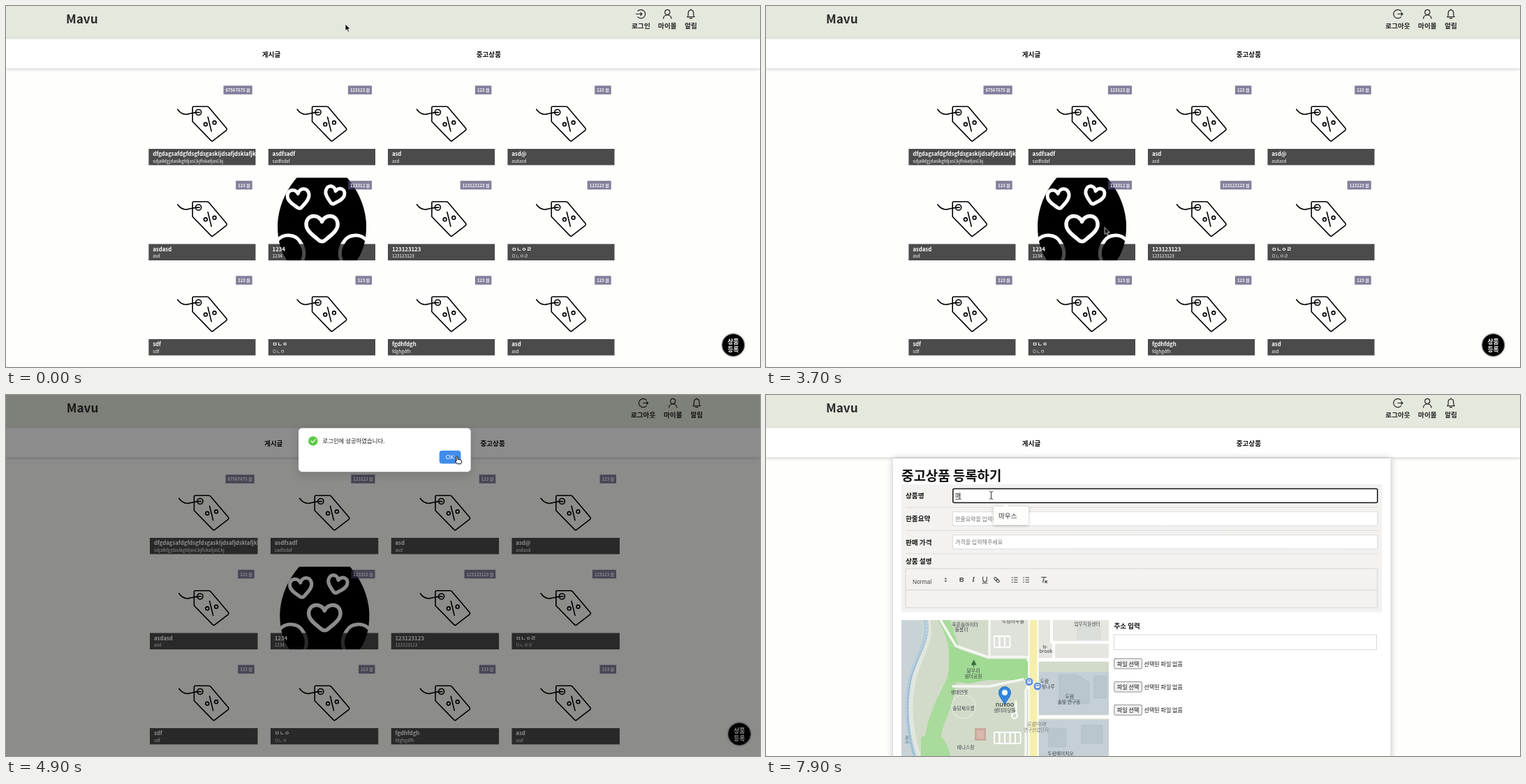
An HTML page with a canvas that plays this animation: 1080 by 518 pixels, repeating every 8 s.

```html
<!DOCTYPE html>
<html lang="ko">
<head>
<meta charset="utf-8">
<style>
html, body { margin: 0; width: 100%; height: 100%; overflow: hidden; background: #fefefd; }
canvas { display: block; }
</style>
</head>
<body>
<canvas id="stage" width="1080" height="518"></canvas>
<script>
const ctx = document.getElementById('stage').getContext('2d');
const LOOP = 8000;
const KR = '"Noto Sans CJK KR", "Noto Sans CJK JP", "Noto Sans CJK", "Noto Sans", sans-serif';
const ARIAL = '"Liberation Sans", Arial, sans-serif';
const PAGE = '#fefefd';
const EMAIL = 'zu_tep@orvy.test';

const LOGIN_AT = 1800, HOME_AT = 3600, MODAL_IN = 3800, MODAL_OUT = 4900, MODAL_END = 5100, FORM_AT = 6600;

const goods = [
  ['dfgdagsafdgfdsgfdsgaskljdsafjdsklafjkldsa', 'sdjalkfgjdaslkgfdjasl;kjflskafjasl;kj', '67567675'],
  ['asdfsadf', 'sadfsdaf', '123123'], ['asd', 'asd', '123'], ['asd@', 'asdasd', '123'],
  ['asdasd', 'asd', '123'], ['1234', '1234', '123312'],
  ['123123123', '123123123', '123123123'], ['ㅁㄴㅇㄹ', 'ㅁㄴㅇㄹ', '123123'],
  ['sdf', 'sdf', '123'], ['ㅁㄴㅇ', 'ㅁㄴㅇ', '123'], ['fgdhfdgh', 'fdghgdfh', '123'], ['asd', 'asd', '123']
];

// time, x, y, shape; positions glide between entries in 100 ms steps
const pointer = [
  [0, 486, 26, 'arrow'], [300, 486, 26, 'arrow'], [400, 545, 26, 'arrow'], [500, 545, 26, 'arrow'],
  [800, 110, 18, 'hand'], [1000, 940, 14, 'hand'], [1200, 1066, 490, 'arrow'],
  [1500, 560, 200, 'hand'], [1600, 529, 180, 'hand'], [1700, 909, 18, 'hand'],
  [1800, 520, 358, 'arrow'], [1900, 520, 358, 'arrow'], [2100, 500, 218, 'beam'], [2200, 500, 218, 'beam'],
  [2500, 496, 251, 'beam'], [3000, 496, 251, 'beam'], [3100, 496, 265, 'beam'], [3300, 496, 265, 'beam'],
  [3500, 486, 319, 'hand'], [3600, 485, 318, 'arrow'], [4200, 485, 318, 'arrow'],
  [4700, 640, 92, 'hand'], [4800, 646, 88, 'hand'], [4900, 646, 88, 'hand'], [5100, 1072, 467, 'arrow'],
  [5300, 1028, 484, 'hand'], [5500, 1028, 484, 'hand'], [5700, 1030, 485, 'hand'], [5800, 1030, 485, 'hand'],
  [6400, 352, 236, 'arrow'], [6500, 352, 236, 'arrow'], [7000, 316.5, 176, 'beam'], [7100, 316.5, 176, 'beam'],
  [7200, 316.5, 140, 'beam'], [7300, 316.5, 140, 'beam'], [7400, 322.5, 144, 'beam'], [8000, 322.5, 144, 'beam']
];

function text(s, x, y, size, color = '#111', weight = 400, align = 'left', family = KR) {
  ctx.font = `${weight} ${size}px ${family}`;
  ctx.textAlign = align;
  ctx.textBaseline = 'middle';
  ctx.fillStyle = color;
  ctx.fillText(s, x, y);
}

function rect(x, y, x2, y2, color) {
  ctx.fillStyle = color;
  ctx.fillRect(x, y, x2 - x, y2 - y);
}

function box(x, y, x2, y2, r, fill, stroke, width = 1) {
  ctx.beginPath();
  ctx.roundRect(x, y, x2 - x, y2 - y, r);
  if (fill) { ctx.fillStyle = fill; ctx.fill(); }
  ctx.shadowColor = 'transparent';
  if (stroke) { ctx.strokeStyle = stroke; ctx.lineWidth = width; ctx.stroke(); }
}

function shadow(color, blur, x = 0, y = 0) {
  ctx.shadowColor = color;
  ctx.shadowBlur = blur;
  ctx.shadowOffsetX = x;
  ctx.shadowOffsetY = y;
}

function line(d, color, width, fill) {
  const path = new Path2D(d);
  if (fill) { ctx.fillStyle = fill; ctx.fill(path); }
  if (!color) return;
  ctx.strokeStyle = color;
  ctx.lineWidth = width;
  ctx.stroke(path);
}

function dot(x, y, r, fill, stroke, width = 1) {
  ctx.beginPath();
  ctx.arc(x, y, r, 0, 7);
  if (fill) { ctx.fillStyle = fill; ctx.fill(); }
  if (stroke) { ctx.strokeStyle = stroke; ctx.lineWidth = width; ctx.stroke(); }
}

function at(x, y, draw, sx = 1, sy = sx, turn = 0) {
  ctx.save();
  ctx.translate(x, y);
  ctx.rotate(turn);
  ctx.scale(sx, sy);
  draw();
  ctx.restore();
}

function header(k, loggedIn) {
  rect(0, 0, 1080, 47.5, '#e5e8dd');
  shadow('rgba(0,0,0,.22)', 5, 0, 1);
  rect(0, 47.5, 1080, 89.5, '#fff');
  shadow('transparent', 0);
  text('Mavu', 86 * k, 18.5, 17.2, '#2b2b2b', 700);
  const ink = '#222';
  const x = (loggedIn ? 905 : 909.5) * k;
  at(x, 11.5, () => {
    if (loggedIn) line('M4.5 -4.3A6.2 6.2 0 1 0 4.5 4.3M0 0H7M4.8 -2.2L7 0L4.8 2.2', ink, 1.2);
    else line('M-4.5 -4.3A6.2 6.2 0 1 1 -4.5 4.3M-7 0H1.5M-.7 -2.2L1.5 0L-.7 2.2', ink, 1.2);
  });
  at(947.3 * k, 11.5, () => {
    dot(0, -2.6, 3.5, null, ink, 1.2);
    line('M-5.8 6.5C-5 -.2 5 -.2 5.8 6.5', ink, 1.2);
  });
  at(981 * k, 11.5, () => line('M-5.2 4.2H5.2L3.8 2V-1.5C3.8 -7.2 -3.8 -7.2 -3.8 -1.5V2ZM-1.5 6.2H1.5M0 -6.8V-5.6', ink, 1.2));
  text(loggedIn ? '로그아웃' : '로그인', x, 28.5, 9.6, ink, 700, 'center');
  text('마이몰', 947.3 * k, 28.5, 9.6, ink, 700, 'center');
  text('알림', 981 * k, 28.5, 9.6, ink, 700, 'center');
  text('게시글', 380 * k, 69, 9.6, '#111', 700, 'center');
  text('중고상품', 691.3 * k, 69, 9.6, '#111', 700, 'center');
}

function tag() {
  line('M41.5 38.5C44 42 48.5 47 56 45.3C62 44 67 42 73 43', '#000', 1.6);
  line('M64.5 34.5Q63 34.5 63 36V56L89.5 83.3Q91 84.7 92.5 83.3L111.5 68.5Q112.8 67 111.7 65.7L86 35.3Q85.2 34.5 83.5 34.5Z', '#000', 1.6);
  dot(71.5, 42.7, 4, null, '#000', 1.6);
  line('M85 49.5L90 69.8', '#000', 1.6);
  dot(81.7, 60, 2.4, null, '#000', 1.6);
  dot(94.4, 57.5, 2.4, null, '#000', 1.6);
}

function heart(x, y, w, h, turn, width) {
  const path = new Path2D();
  const outline = new Path2D('M0 -.45C.2 -1.05 1 -1 1 -.25C1 .25 .5 .6 .15 .95Q0 1.05 -.15 .95C-.5 .6 -1 .25 -1 -.25C-1 -1 -.2 -1.05 0 -.45Z');
  path.addPath(outline, new DOMMatrix([w, 0, 0, h, 0, 0]));
  at(x, y, () => {
    ctx.strokeStyle = '#fff';
    ctx.lineWidth = width;
    ctx.stroke(path);
  }, 1, 1, turn);
}

function egg() {
  line('M41 0C22 22 13.5 48 13.5 70C13.5 92 19 107 27 119H127C135 107 140.5 92 140.5 70C140.5 48 132 22 113 0Z', null, 0, '#000');
  heart(43.5, 29.5, 15.5, 14.5, -.12, 5);
  heart(95, 25, 13.7, 13, .25, 5);
  heart(77, 72, 22.5, 19.5, 0, 5.5);
  line('M14 89C23 80 39 81 45 91C52 101 53 110 49 119M140 89C131 80 115 81 109 91C102 101 101 110 105 119', '#fff', 5);
}

function card([title, note, price], i, k) {
  const w = 153.5 * k;
  at((204.2 + 171.35 * (i % 4)) * k, 109.8 + 136.5 * Math.floor(i / 4), () => {
    ctx.beginPath();
    ctx.rect(0, 0, w, 119);
    ctx.clip();
    at(0, 0, i === 5 ? egg : tag, k, 1);
    const label = price + ' 원';
    ctx.font = `700 6px ${KR}`;
    rect(w - 11 - ctx.measureText(label).width, 4.5, w - 5, 17, 'rgba(81,75,115,.7)');
    text(label, w - 8, 11, 6, '#fff', 700, 'right');
    rect(0, 95.2, w, 118.7, 'rgba(0,0,0,.7)');
    text(title, 6, 102.5, 7.8, '#fff', 700);
    text(note, 6, 112.7, 6.4, '#fff');
  });
}

function home(k, loggedIn) {
  header(k, loggedIn);
  goods.forEach((g, i) => card(g, i, k));
  shadow('rgba(0,0,0,.5)', 3);
  dot(1041.7 * k, 486.5, 16, '#000');
  shadow('transparent', 0);
  dot(1041.7 * k, 486.5, 16, null, '#666', .8);
  text('상품', 1041.7 * k, 481.5, 8.6, '#fff', 700, 'center');
  text('등록', 1041.7 * k, 493, 8.6, '#fff', 700, 'center');
}

function field(y, focused, fill) {
  shadow('rgba(0,0,0,.6)', 3, 1, 1);
  box(422, y, 654.5, y + 24, 11, fill, focused ? '#000' : '#999', focused ? 2 : .8);
}

function login(t) {
  header(1, false);
  shadow('rgba(0,0,0,.9)', 3, 2, 2);
  box(372.5, 101, 703.5, 524, 22, PAGE, '#111', 1);
  text('Fern Dusk', 538, 144.5, 17.3, '#111', 700, 'center');
  const filled = t >= 2300, onPassword = t >= 3100;
  const onEmail = t >= 2000 && !onPassword;
  field(206, onEmail, filled ? '#e6f1fa' : '#fff');
  if (filled) {
    text(EMAIL, 427.5, 218, 6.5, '#111', 400, 'left', ARIAL);
    const end = 427.5 + ctx.measureText(EMAIL).width;
    if (onEmail) {
      rect(427.5, 221.2, end, 221.9, '#d66');
      rect(end, 214, end + .8, 222, '#000');
    }
  } else text('이메일을 입력하세요', 427.5, 218, 6.6, '#757575');
  field(254.3, onPassword, '#fff');
  const typed = Math.max(0, Math.floor((t - 3100) / 100) * 2);
  if (typed) text('•'.repeat(typed), 427.5, 266, 7, '#111', 400, 'left', ARIAL);
  else text('비밀번호를 입력하세요', 427.5, 266, 6.6, '#757575');
  field(313.7, false, '#efefef');
  text('로그인', 538, 326, 11.7, '#111', 400, 'center');
}

function modal(t) {
  const clamp = v => Math.min(1, Math.max(0, v));
  const inn = clamp((t - MODAL_IN) / 200), out = clamp((t - MODAL_OUT) / 200);
  const ease = n => 1 - (1 - inn) ** n;
  const left = 1 - out * out;
  ctx.fillStyle = `rgba(0,0,0,${.45 * ease(2.3) * left})`;
  ctx.fillRect(0, 0, 1080, 518);
  const size = .2 + .8 * ease(4.16) * left;
  ctx.save();
  ctx.globalAlpha = ease(3.6) * left;
  ctx.translate(486, 327);
  ctx.scale(size, size);
  ctx.translate(-486, -327);
  shadow('rgba(0,0,0,.15)', 14, 0, 4);
  box(419, 47.5, 665.7, 110.3, 5, '#fff');
  dot(439.8, 66, 6.8, '#5bcb45');
  line('M437 66L439.2 68.2L443 63.8', '#fff', 1.2);
  text('로그인에 성공하였습니다.', 453.5, 66, 8.4, '#222');
  box(620.7, 79.8, 651.5, 98.6, 4, t >= 4700 ? '#408ceb' : '#1c6ce6');
  text('OK', 636, 89.5, 8.5, '#fff', 400, 'center', ARIAL);
  ctx.restore();
}

function toolbar() {
  const ink = '#444';
  text('Normal', 210, 269, 8.4, ink, 400, 'left', ARIAL);
  line('M255.5 264.3L257.3 262L259.1 264.3ZM255.5 266.2L257.3 268.5L259.1 266.2Z', null, 0, ink);
  text('B', 280.3, 265.5, 9.6, ink, 700, 'center', ARIAL);
  text('I', 297, 265.5, 9.6, ink, 'italic 700', 'center', '"Liberation Serif", serif');
  line('M310.7 261V265.5C310.7 269 316.3 269 316.3 265.5V261M310 270H317', ink, 1.1);
  at(330.5, 265.3, () => {
    box(-4.5, -1.7, .3, 1.7, 1.7, null, ink, 1.1);
    box(-.3, -1.7, 4.5, 1.7, 1.7, null, ink, 1.1);
  }, 1, 1, .75);
  for (const y of [262, 265.3, 268.6]) {
    rect(355, y - .5, 360.5, y + .5, ink);
    rect(371.5, y - .5, 377, y + .5, ink);
    rect(352, y - .8, 353.2, y + .8, ink);
    dot(369, y, .8, ink);
  }
  line('M394.5 261.5H401.5M398.5 261.5L396.5 269M399.5 266.5L402.5 269.5M402.5 266.5L399.5 269.5', ink, 1.1);
}

function parking(x, y, count) {
  for (let i = 0; i < count; i++) box(x + i * 7.5, y, x + i * 7.5 + 7.5, y + 16, 1, null, '#fff', 1.8);
}

function mapView() {
  ctx.save();
  ctx.beginPath();
  ctx.rect(194, 323, 297, 195);
  ctx.clip();
  rect(194, 323, 491, 518, '#d2dbca');
  line('M194 323H222C230 345 213 375 205 405C198 435 200 475 212 518H194Z', null, 0, '#c9d3d7');
  line('M246 323C262 348 268 380 258 410C240 445 222 480 230 518H250C246 490 256 470 266 445L280 375L264 323Z', null, 0, '#a8db9c');
  line('M231 323C238 350 219 375 211 405C203 440 205 480 217 518', '#e1e6de', 9);
  line('M227 323C234 350 215 375 207 405C199 440 201 480 213 518', '#b3cde0', 5);
  ctx.setLineDash([3, 2]);
  line('M231 323C237 350 217 375 208 405C200 440 202 480 212 518', '#7f9caf', .8);
  ctx.setLineDash([]);
  rect(320, 323, 375, 377, '#dfe2da');
  line('M262 360L318 379H375V409H318L290 414L262 410Z', null, 0, '#a0da93');
  line('M222 492C240 478 258 486 264 518H222Z', null, 0, '#a8db9c');
  line('M250 323L272 360L318 376H378M320 323V376M268 418H320L368 408M372 518V424L378 412M358 460V440', '#f5f6f1', 3.5);
  parking(327, 346, 3);
  parking(327, 484, 5);
  rect(391, 323, 491, 378, '#e6e6e1');
  rect(391, 397, 491, 459, '#c5d0d6');
  rect(391, 466, 491, 518, '#c5d0d6');
  line('M409 323V355H491M412 355V376', '#fff', 4);
  line('M420 401H445L463 412V443H420ZM470 403H488V435H470ZM405 478H430V505H405ZM452 474H482V500H452Z', '#b0bdc5', .7, '#b9c6cd');
  rect(445, 331, 480, 351, '#dbddd8');
  rect(299, 478, 315, 496, '#c9aa9f');
  rect(302, 481, 312, 493, '#d8b9ad');
  line('M376 380H491M390 462H491', '#fff', 5);
  line('M383 323V518', '#fff', 15);
  line('M383 323V518', '#f6efac', 11);
  dot(356, 460, 4, '#d2dbca', '#fff', 2);
  dot(283, 447, 17, null, '#e2e7da', 1.5);
  for (const [x, y] of [[377, 411.5], [389, 418]]) {
    dot(x, y, 6, '#5d8fd8', '#fff', .8);
    box(x - 2.5, y - 3, x + 2.5, y + 2.3, 1, '#fff');
    rect(x - 1.6, y - 2, x + 1.6, y, '#5d8fd8');
  }
  line('M297.5 381L294.5 387H300.5ZM297.5 386V390', '#37683b', 1, '#37683b');
  const labels = [
    ['푸른솔아이터', 285, 329], ['돌봄터', 280, 336.5], ['도담마루뜰', 354, 324], ['업무지원센터', 460, 328],
    ['N-', 400, 361], ['brook', 401, 367.5], ['달무리', 297, 395], ['쉼터공원', 297, 403],
    ['도람', 399, 410], ['빛나루', 404, 418], ['생태연못', 277, 426], ['솔담재오름', 283, 449],
    ['도람', 435, 432], ['솔빛 연구동', 434, 440], ['샘터마당뜰', 342, 452],
    ['테니스장', 286, 505], ['두람에이치오', 422, 514]
  ];
  line('M342 444C338 436 333.5 433 333.5 427A8.5 8.5 0 0 1 350.5 427C350.5 433 346 436 342 444Z', '#1d69be', .8, '#3285e0');
  dot(342, 427, 4, '#fff');
  for (const [s, x, y] of labels) text(s, x, y, 6.8, '#3c4146', 400, 'center');
  text('nuvoo', 342, 443.5, 9, '#222', 400, 'center');
  at(387, 472, () => text('도람미래', 0, 0, 7.5, '#777', 'italic 400', 'center'));
  text('연구산업단지', 387, 480.5, 6.5, '#777', 400, 'center');
  at(202, 494, () => text('새내', 0, 0, 6.5, '#557488', 400, 'center'), 1, 1, 1.5);
  ctx.restore();
}

function form(t) {
  header(1, true);
  shadow('rgba(0,0,0,.25)', 9);
  rect(182, 91, 894.5, 540, '#fff');
  shadow('transparent', 0);
  text('중고상품 등록하기', 194, 115.5, 18.9, '#111', 700);
  rect(194, 128, 882.5, 311.5, '#f3f2f1');
  const rows = [['상품명', ''], ['한줄요약', '한줄요약을 입력해주세요'], ['판매 가격', '가격을 입력해주세요']];
  const focused = t >= 7400;
  rows.forEach(([label, hint], i) => {
    const y = 144.5 + 33.2 * i;
    const active = !i && focused;
    text(label, 200, y, 9.6, '#111', 700);
    box(267.8, y - 10, 875.8, y + 10, active ? 2 : 0, '#fff', active ? '#111' : '#d4d4d4', active ? 1.5 : .8);
    if (hint) text(hint, 271, y, 8, '#757575');
    rect(200, y + 16.4, 876, y + 17.2, '#d9d9d9');
  });
  text('상품 설명', 200, 238.7, 9.6, '#111', 700);
  box(200.3, 249, 875.8, 305.3, 0, null, '#ccc', .8);
  rect(200, 279.4, 876, 280.2, '#ccc');
  toolbar();
  mapView();
  text('주소 입력', 498.5, 331, 9.5, '#111', 700);
  box(498.8, 344, 874.5, 365.3, 0, '#fff', '#ccc', .8);
  for (const y of [385.5, 418.8, 452]) {
    box(498.8, y - 7.3, 538.5, y + 7.3, 1.5, '#efefef', '#767676', .8);
    text('파일 선택', 518.7, y, 8.1, '#111', 400, 'center');
    text('선택된 파일 없음', 541.5, y, 8.05, '#111');
  }
  if (t < 7700) return;
  const typed = t < 7800 ? 'ㅁ' : t < 7900 ? '마' : '매';
  text(typed, 271, 145, 9, '#111');
  rect(271, 149.4, 279.5, 150.1, '#111');
  if (t < 7800) return;
  shadow('rgba(0,0,0,.25)', 4, 0, 1);
  box(325.7, 160, 376, 186.5, 2, '#fdfdfc');
  line('M340 160L344 156.5L348 160Z', null, 0, '#fdfdfc');
  text('마우스', 333, 173.5, 9.6, '#333');
}

const shapes = {
  arrow: () => line('M0 0V9.6L2.3 7.6L4 11.2L5.6 10.4L4 7H7Z', '#fff', .7, '#111'),
  hand: () => line('M-1 1Q0 -.8 1 1V4.2L5.8 5.2Q7 5.6 6.7 7.2L5.8 10.8H.2L-2.8 7Q-2.6 5.4 -1 6.4Z', '#111', 1, '#fff'),
  beam: () => line('M-2 -5.5Q0 -5.5 0 -4Q0 -5.5 2 -5.5M0 -4.5V4.5M-2 5.5Q0 5.5 0 4Q0 5.5 2 5.5', '#333', 1)
};

function cursor(t) {
  const now = Math.floor(t / 100) * 100;
  const i = pointer.findIndex(p => p[0] > now);
  const [ta, xa, ya, shape] = pointer[i - 1], [tb, xb, yb] = pointer[i];
  const p = (now - ta) / (tb - ta);
  at(xa + (xb - xa) * p, ya + (yb - ya) * p, shapes[shape]);
}

function draw(t) {
  ctx.lineJoin = ctx.lineCap = 'round';
  shadow('transparent', 0);
  rect(0, 0, 1080, 518, PAGE);
  const open = t >= MODAL_IN && t < MODAL_END;
  if (t < LOGIN_AT) home(1, false);
  else if (t < HOME_AT) login(t);
  else if (t < FORM_AT) home(open ? 1080 / 1071 : 1, true);
  else form(t);
  if (open) modal(t);
  shadow('transparent', 0);
  cursor(t);
}

const start = performance.now();
function tick() {
  draw((performance.now() - start) % LOOP);
  requestAnimationFrame(tick);
}
tick();
</script>
</body>
</html>
```
